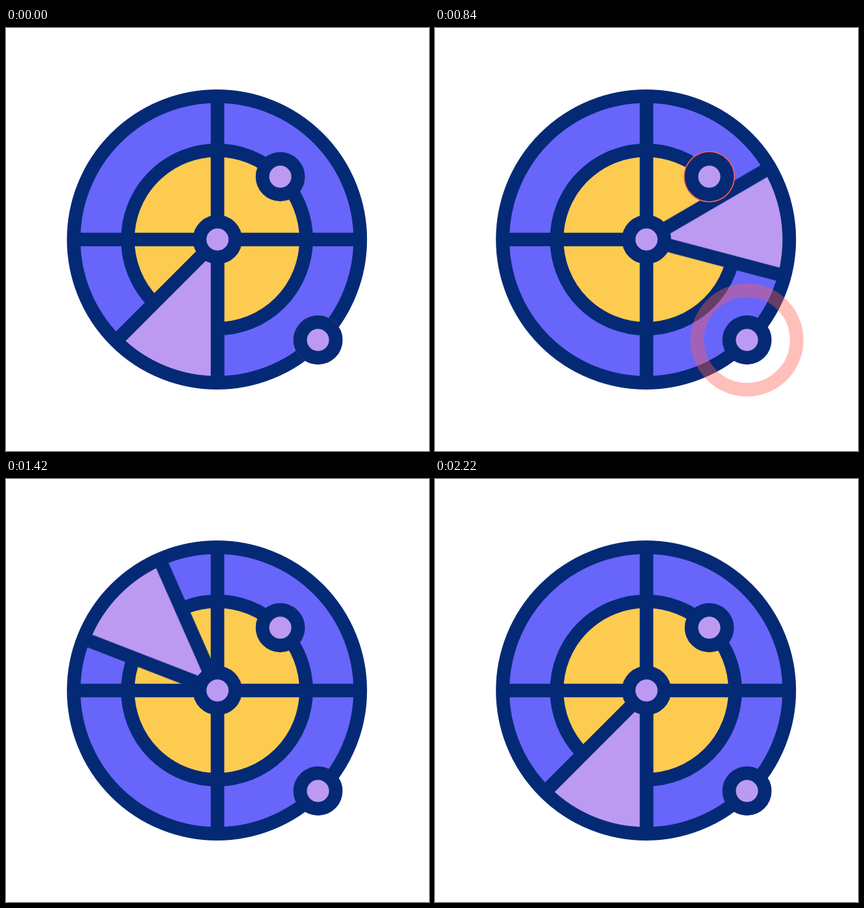
Recreate the animation shown at these times as an HTML page without scripts. Size 640x640 px, loop 2.4 s.

```html
<!DOCTYPE html>
<html lang="en">
<head>
<meta charset="utf-8">
<title>Radar</title>
<style>
  html, body { margin: 0; width: 100%; height: 100%; overflow: hidden; background: #fff; }
  svg { display: block; width: 100%; height: 100%; }

  .line { fill: none; stroke: #042a76; stroke-width: 20.5; }
  .purple { fill: #6865fa; }
  .yellow { fill: #fdcb50; }
  .lilac { fill: #bc9af2; }

  .sweep { transform-origin: 320px 320px; animation: sweep 2400ms infinite; }
  .pulse {
    fill: none; stroke: #ff5f52; stroke-width: 20.5; opacity: 0;
    animation: pulse 2400ms linear infinite;
  }
  .late { animation-delay: 405ms; }

  @keyframes sweep {
    0% { transform: rotate(0deg); animation-timing-function: cubic-bezier(.28, 0, .72, 1); }
    92.5%, 100% { transform: rotate(-360deg); }
  }
  @keyframes pulse {
    0%, 17.625% { r: 27px; opacity: 1; }
    28.46% { r: 57px; opacity: 1; }
    39.29%, 100% { r: 87px; opacity: 0; }
  }
</style>
</head>
<body>
<svg viewBox="0 0 640 640">
  <defs>
    <circle id="dot" class="line lilac" r="27" style="fill:#bc9af2"/>
  </defs>

  <circle class="purple" cx="319.2" cy="320" r="216.8"/>
  <circle class="yellow" cx="319.2" cy="320" r="135"/>
  <circle class="line" cx="319.2" cy="320" r="135"/>
  <path class="line" d="M320 104V536M104 320H536"/>

  <g class="sweep">
    <path class="lilac" d="M320 320V536A216 216 0 0 1 167.3 472.7Z"/>
    <path class="line" d="M320 536V320L167.3 472.7"/>
  </g>

  <circle class="line" cx="319.2" cy="320" r="216.8"/>
  <use href="#dot" x="320" y="320"/>

  <circle class="pulse" cx="472" cy="472" r="27"/>
  <use href="#dot" x="472" y="472"/>
  <circle class="pulse late" cx="415" cy="225" r="27"/>
  <use href="#dot" x="415" y="225"/>
</svg>
</body>
</html>
```
